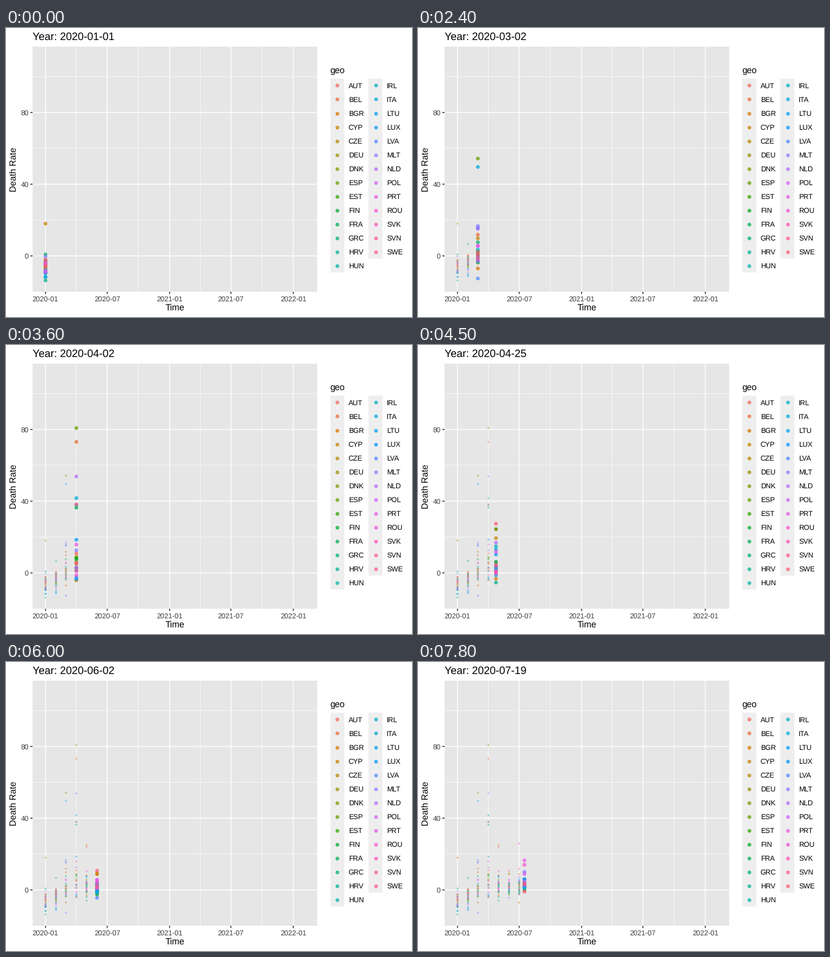
These frames come from a looping animation (672 px wide and 480 px high, 8 s). A matplotlib script:

```python
import numpy as np
import matplotlib.pyplot as plt
from matplotlib.animation import FuncAnimation
from matplotlib.patches import Rectangle

plt.rcParams.update({"font.family": "Liberation Sans", "text.hinting": "none"})

W, H, DPI = 672, 480, 96
PX = 72 / DPI  # points per pixel
LEFT, TOP, RIGHT, BOTTOM = 44, 31, 515, 438
PANEL, KEY, TICK, TICK_TEXT = "#E6E6E6", "#EEEEEE", "#262626", "#3C3C3C"
STEP_MS, TICK_MS = 300, 100
STEPS_PER_MONTH = 4
DAYS_PER_STEP = 762 / 99

CODES = ("AUT BEL BGR CYP CZE DEU DNK ESP EST FIN FRA GRC HRV HUN "
         "IRL ITA LTU LUX LVA MLT NLD POL PRT ROU SVK SVN SWE").split()
MONTH_DAYS = np.array([0, 31, 60, 91, 121, 152, 182, 213])

# Per month: range of the bulk of the countries, then those that stand out.
MONTHS = [
    ((-9.5, -3), dict(CYP=18, GRC=.8, MLT=-.4, BGR=-2.2, SVN=-2.4, POL=-3.8, ROU=-4.2,
                      SVK=-5, SWE=-6, LVA=-7.9, NLD=-8.5, PRT=-9, LUX=-9.3, ITA=-9.6,
                      LTU=-11.6, HUN=-11.8, HRV=-13.7)),
    ((-5.5, 0), dict(GRC=6.7, AUT=.5, SWE=0, ROU=-1.5, SVN=-2, PRT=-3, POL=-4.5,
                     SVK=-4.8, EST=-6, FRA=-6.8, MLT=-7.5, NLD=-8, LVA=-9.5,
                     LTU=-10.5, LUX=-11.2)),
    ((-3.5, 2.5), dict(ESP=54.3, ITA=49.6, MLT=16.7, LUX=15.6, NLD=15.1, BEL=11.8,
                       CYP=9.8, GRC=7.6, PRT=5.8, POL=5.4, IRL=3.5, SWE=2.1, SVN=.5,
                       SVK=-1, ROU=-2.5, CZE=-3.8, BGR=-7, LVA=-12.6)),
    ((1, 5), dict(ESP=80.8, BEL=73.1, NLD=53.8, ITA=41.7, SWE=38.2, IRL=37.9, FRA=36.4,
                  LUX=18.5, PRT=15.8, MLT=12.6, AUT=10.9, DEU=8.9, EST=8.2, FIN=7.8,
                  DNK=6.2, SVN=5.4, POL=3, CYP=2.4, HUN=1.2, ROU=-1.2, LTU=-2.4,
                  LVA=-3.2, HRV=-3.6, BGR=-4.1)),
    ((-1.5, 4.5), dict(CYP=25.1, SWE=23.9, PRT=10.4, BEL=8.1, LUX=7.6, IRL=7.1, ESP=5.6,
                       NLD=4.5, ITA=3.5, LTU=-1, BGR=-3, FRA=-3.9, HRV=-6)),
    ((-2, 4), dict(SWE=10.7, CYP=9.1, BGR=8.8, POL=5.6, PRT=5.4, ROU=4, MLT=3.8, SVN=2,
                   SVK=1, LTU=-1, EST=-2.6, LVA=-4.4)),
    ((-2.5, 5), dict(PRT=25.9, ROU=11.8, BGR=8.8, MLT=7.1, LUX=5.8, POL=5.1, LTU=4,
                     SVK=3, SWE=.5, LVA=-.5, SVN=-2.4, CYP=-7)),
    ((1, 6), dict(ROU=16.2, MLT=13, POL=12.6, CYP=9, SVN=8.5, LTU=8, PRT=7, LUX=6,
                  LVA=4.5, SVK=4, BGR=3, SWE=-2.5)),
]


def month_values(index, bulk, known):
    rest = [c for c in CODES if c not in known]
    spread = np.random.default_rng(index).permutation(np.linspace(*bulk, len(rest)))
    values = {**known, **dict(zip(rest, spread))}
    return [values[c] for c in CODES]


RATES = np.array([month_values(i, *m) for i, m in enumerate(MONTHS)])


def hcl(hue, chroma=100, lum=65, gamma=1.8):
    """Polar LUV colour (D65) as RGB, encoded with a plain gamma."""
    a = np.radians(hue)
    u = chroma * np.cos(a) / (13 * lum) + .1978
    v = chroma * np.sin(a) / (13 * lum) + .4683
    y = ((lum + 16) / 116) ** 3
    x = 9 * y * u / (4 * v)
    z = 3 * y / v - 5 * y - x / 3
    linear = np.clip([3.2405 * x - 1.5371 * y - .4985 * z,
                      -.9693 * x + 1.8760 * y + .0416 * z,
                      .0556 * x - .2040 * y + 1.0572 * z], 0, 1)
    return linear ** (1 / gamma)


COLORS = np.array([hcl(15 + 360 * i / len(CODES)) for i in range(len(CODES))])


def x_px(day):
    return 65.4 + .561 * np.asarray(day)


def y_px(rate):
    return 378.5 - 2.977 * np.asarray(rate)


fig = plt.figure(figsize=(W / DPI, H / DPI), dpi=DPI, facecolor="white")
ax = fig.add_axes([0, 0, 1, 1])
ax.set(xlim=(0, W), ylim=(H, 0))
ax.axis("off")


def box(x, y, w, h, color):
    ax.add_patch(Rectangle((x, y), w, h, facecolor=color, linewidth=0))


def line(xs, ys, color="white", width=1.42):
    ax.plot(xs, ys, color=color, lw=width * PX, solid_capstyle="butt",
            snap=False, zorder=1.5)


def label(x, y, text, size=8.8, color="black", **kw):
    return ax.text(x, y, text, fontsize=size, color=color, va="baseline", **kw)


def dots(points, diameter, colors, alpha):
    """Translucent discs whose equally translucent outline overlaps the fill."""
    x, y = np.transpose(points)
    rgba = np.column_stack([colors, np.full(len(colors), alpha)])
    return ax.scatter(x, y, s=(diameter * PX) ** 2, facecolors=rgba, edgecolors=rgba,
                      linewidths=.945 * PX, zorder=3)


def draw_panel():
    box(LEFT, TOP, RIGHT - LEFT, BOTTOM - TOP, PANEL)
    ticks = x_px([0, 182, 366, 547, 731])
    for x in (ticks[1:] + ticks[:-1]) / 2:
        line([x, x], [TOP, BOTTOM], width=.71)
    for rate in (20, 60, 100):
        line([LEFT, RIGHT], [y_px(rate)] * 2, width=.71)
    names = ("2020-01", "2020-07", "2021-01", "2021-07", "2022-01")
    for x, name in zip(ticks, names):
        line([x, x], [TOP, BOTTOM])
        line([x, x], [BOTTOM, BOTTOM + 3.7], TICK)
        label(x, 453.4, name, color=TICK_TEXT, ha="center")
    for rate in (0, 40, 80):
        y = y_px(rate)
        line([LEFT, RIGHT], [y, y])
        line([LEFT - 3.7, LEFT], [y, y], TICK)
        label(37.5, y + 4.2, str(rate), color=TICK_TEXT, ha="right")
    label(279.5, 470, "Time", 11, ha="center")
    label(18, 234.5, "Death Rate", 11, ha="center", rotation=90, rotation_mode="anchor")


def draw_legend():
    key, rows = 23.04, 14
    label(536.3, 75, "geo", 11)
    for i, code in enumerate(CODES):
        col, row = divmod(i, rows)
        x, y = 536.5 + 63.7 * col, 83.9 + key * row
        box(x, y, key, key, KEY)
        dots([(x + key / 2, y + key / 2)], 5.2, COLORS[i:i + 1], .7)
        label(x + 30.2, y + key / 2 + 4.3, code)


draw_panel()
draw_legend()
title = label(44, 20, "", 13.2)

TRAIL_POINTS = np.column_stack([np.repeat(x_px(MONTH_DAYS), len(CODES)),
                                y_px(RATES).ravel()])
trail = dots(TRAIL_POINTS, 2.4, np.tile(COLORS, (len(MONTHS), 1)), .3)
current = dots(TRAIL_POINTS[:len(CODES)], 5.2, COLORS, .7)


def update(tick):
    step = tick * TICK_MS // STEP_MS
    month, part = divmod(step, STEPS_PER_MONTH)
    t = part / STEPS_PER_MONTH
    day = (1 - t) * MONTH_DAYS[month] + t * MONTH_DAYS[month + 1]
    rates = (1 - t) * RATES[month] + t * RATES[month + 1]
    current.set_offsets(np.column_stack([np.full(len(CODES), x_px(day)), y_px(rates)]))
    passed = -(-step // STEPS_PER_MONTH)
    trail.set_offsets(TRAIL_POINTS[:passed * len(CODES)])
    date = np.datetime64("2020-01-01") + int(step * DAYS_PER_STEP)
    title.set_text(f"Year: {date}")
    return title, trail, current


anim = FuncAnimation(fig, update, frames=80, interval=TICK_MS, repeat=True,
                     repeat_delay=0, blit=False)
plt.show()
```
